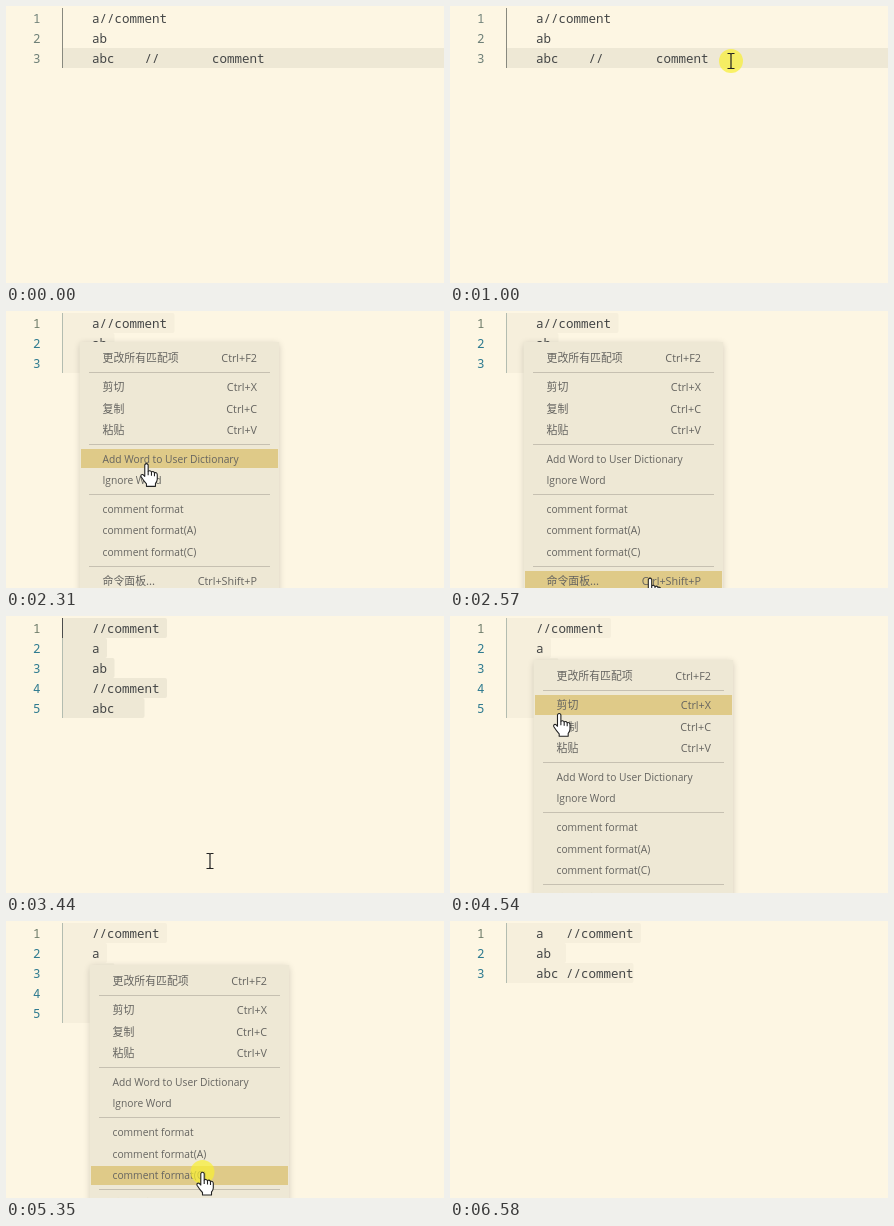
Write an HTML page with a canvas that moves like this. It is 438 px wide and 277 px high and loops after 6650 ms.

```html
<!DOCTYPE html>
<html lang="zh">
<head>
<meta charset="utf-8">
<style>
  html, body { margin: 0; width: 100%; height: 100%; overflow: hidden; background: #fdf6e3; }
  canvas { display: block; }
</style>
</head>
<body>
<canvas id="stage" width="438" height="277"></canvas>
<script>
const ctx = document.getElementById('stage').getContext('2d');
const LOOP = 6650;
const LEFT = 56, TOP = 2, ROW = 20, CHAR = 7.5, INDENT = 4;
const CODE_FONT = '12.5px "Noto Sans Mono", monospace';
const MENU_FONT = '10.25px "Open Sans", "Noto Sans", sans-serif';
const KEYS_FONT = '10.8px "Open Sans", "Noto Sans", sans-serif';
const CJK_FONT = '10.9px "Noto Sans CJK SC", "Noto Sans CJK", sans-serif';

const documents = [
  { from: 0, lines: ['a//comment', 'ab', 'abc    //       comment'] },
  { from: 3310, lines: ['//comment', 'a', 'ab', '//comment', 'abc    '] },
  { from: 5510, lines: ['a   //comment', 'ab ', 'abc //comment'] },
];

const DRAG_START = 1000, DRAG_END = 1420, BLUR = 6510;
const menus = [
  { from: 2100, to: 3310, x: 73.6, y: 30.6 },
  { from: 4270, to: 5510, x: 83.6, y: 44 },
];
const presses = [[DRAG_START, 1900], [2980, 3310], [5350, 5510]];

// [centre offset, label, shortcut]; an entry without a label is a separator
const menuItems = [
  [16, '更改所有匹配项', 'Ctrl+F2'],
  [30.5],
  [45, '剪切', 'Ctrl+X'],
  [67, '复制', 'Ctrl+C'],
  [88, '粘贴', 'Ctrl+V'],
  [102.5],
  [117, 'Add Word to User Dictionary'],
  [138, 'Ignore Word'],
  [152.5],
  [167, 'comment format'],
  [188.5, 'comment format(A)'],
  [210.4, 'comment format(C)'],
  [224.5],
  [239, '命令面板...', 'Ctrl+Shift+P'],
];

// [time, x, y]
const mousePath = [
  [0, 400, 300], [70, 394, 269], [140, 372, 222], [210, 325, 146], [280, 289, 69],
  [480, 180, 24], [680, 113, 16], [790, 113, 16], [950, 281, 55], [1040, 281, 55],
  [1420, 54, 10.5], [1760, 54, 10.5], [1970, 74, 31], [2100, 74, 31],
  [2500, 200, 261], [2570, 200, 267], [2980, 202, 222], [3310, 202, 222],
  [3380, 204, 245], [3500, 204, 245], [3980, 84, 44], [4270, 84, 44],
  [4540, 109, 96.5], [4610, 122, 151], [5020, 195, 249], [5170, 196.5, 251],
  [5760, 196.5, 251], [5830, 215, 253], [6030, 340, 264], [6095, 400, 300], [LOOP, 400, 300],
];

const clamp = (v, lo, hi) => Math.max(lo, Math.min(hi, v));
const within = (t, [from, to]) => t >= from && t < to;

function mouseAt(t) {
  const i = mousePath.findIndex(p => p[0] > t);
  const [t0, x0, y0] = mousePath[i - 1], [t1, x1, y1] = mousePath[i];
  const k = (t - t0) / (t1 - t0);
  return { x: x0 + (x1 - x0) * k, y: y0 + (y1 - y0) * k };
}

function fillRect(color, x, y, w, h, radius = 0) {
  ctx.fillStyle = color;
  ctx.beginPath();
  ctx.roundRect(x, y, w, h, radius);
  ctx.fill();
}

function text(str, x, y, font, color, align = 'left') {
  ctx.font = font;
  ctx.fillStyle = color;
  ctx.textAlign = align;
  ctx.fillText(str, x, y);
}

// Where the selection begins; it always runs to the end of the document.
function selectionStart(t, mouse, lines) {
  if (t < DRAG_START) return null;
  if (t >= DRAG_END) return { row: 0, col: 0 };
  const row = clamp(Math.floor((mouse.y - TOP) / ROW), 0, lines.length - 1);
  const col = clamp(Math.round((mouse.x - LEFT) / CHAR), 0, INDENT + lines[row].length);
  const empty = row === lines.length - 1 && col === INDENT + lines[row].length;
  return empty ? null : { row, col };
}

function drawEditor(t, mouse, focused) {
  const doc = documents.findLast(d => t >= d.from);
  const { lines } = doc;
  const last = lines.length - 1;
  const start = selectionStart(t, mouse, lines);

  if (!start) fillRect('#eee8d5', LEFT, TOP + last * ROW, 438 - LEFT, ROW);
  lines.forEach((line, row) => {
    const y = TOP + row * ROW;
    if (start && row >= start.row) {
      const col = row === start.row ? start.col : 0;
      const end = INDENT + line.length + (row < last ? 1 : 0);
      fillRect(focused ? '#eee8d5' : '#f6efdc', LEFT + col * CHAR, y, (end - col) * CHAR, ROW, [0, 2, 2, 0]);
    }
    const numberColor = !start ? '#6f8078' : row === start.row ? '#6c7a68' : '#2f7b90';
    text(row + 1, 34.5, y + 14.5, CODE_FONT, numberColor, 'right');
    text(line, LEFT + INDENT * CHAR, y + 14.5, CODE_FONT, '#444646');
  });
  fillRect(start ? '#b3bcb0' : '#88897f', LEFT, TOP, 1, lines.length * ROW);

  const blinkOn = Math.floor((t - doc.from) / 500) % 2 === 0;
  if (doc.from && focused && blinkOn) fillRect('#4a4c4c', LEFT, TOP, 1, ROW);
}

function drawMenu({ x, y }, hovered) {
  ctx.save();
  ctx.shadowColor = 'rgba(0,0,0,.2)';
  ctx.shadowBlur = 7;
  ctx.shadowOffsetY = 2;
  fillRect('#eee8d5', x, Math.round(y), 199.5, 290);
  ctx.restore();
  for (const item of menuItems) {
    const [offset, label, shortcut] = item;
    if (!label) {
      fillRect('#c6c0b1', Math.round(x) + 9, Math.floor(y + offset), 181, 1);
      continue;
    }
    const baseline = Math.round(y + offset + 4);
    if (item === hovered) {
      const top = Math.round(y + offset - 9.6), bottom = Math.round(y + offset + 9.6);
      fillRect('#dfca88', Math.round(x) + 1, top, 197, bottom - top);
    }
    const isCjk = label.charCodeAt(0) > 255;
    text(label, x + 22.9, baseline, isCjk ? CJK_FONT : MENU_FONT, '#656460');
    if (shortcut) text(shortcut, x + 177.4, baseline, KEYS_FONT, '#656460', 'right');
  }
}

const arrowShape = new Path2D('M0 0V16L3.7 12.6L6.4 18.8L9 17.6L6.3 11.6H11.3Z');
const handShape = new Path2D(
  'M-1.7 1.5Q0 -1 1.7 1.5V8Q3.5 6.6 5 8.6Q6.8 7.5 8 9.4Q10.6 8.7 10.8 11.5V16' +
  'Q10.6 18.5 9 20V23H0V20.5Q-2.5 18 -5.5 13.2Q-6 10.8 -3.5 11.2L-1.7 13Z');
const handCreases = new Path2D('M1.7 8V12M5 8.6V12.5M8 9.4V13');
const beamShape = new Path2D('M-3.5 -7.5H-1Q0 -7.5 0 -6.5Q0 -7.5 1 -7.5H3.5M0 -6.5V6.5M-3.5 7.5H-1Q0 7.5 0 6.5Q0 7.5 1 7.5H3.5');

function drawPointer(mouse, kind, pressed) {
  if (pressed) fillRect('rgba(248,240,50,.7)', mouse.x - 12, mouse.y - 12, 24, 24, 12);
  ctx.save();
  ctx.translate(mouse.x, mouse.y);
  ctx.lineJoin = 'round';
  ctx.strokeStyle = '#222';
  if (kind === 'beam') {
    ctx.lineWidth = 1.2;
    ctx.stroke(beamShape);
  } else {
    const shape = kind === 'hand' ? handShape : arrowShape;
    ctx.fillStyle = '#fff';
    ctx.fill(shape);
    ctx.lineWidth = 1.1;
    ctx.stroke(shape);
    if (kind === 'hand') ctx.stroke(handCreases);
  }
  ctx.restore();
}

function draw(t) {
  const mouse = mouseAt(t);
  const menu = menus.find(m => within(t, [m.from, m.to]));
  const hovered = menu && menuItems.find(([offset, label]) =>
    label && Math.abs(mouse.y - menu.y - offset) < 10.5);

  fillRect('#fdf6e3', 0, 0, 438, 277);
  drawEditor(t, mouse, !menu && t < BLUR);
  if (menu) drawMenu(menu, hovered);
  const kind = hovered ? 'hand' : menu || mouse.x < LEFT + 1 ? 'arrow' : 'beam';
  drawPointer(mouse, kind, presses.some(p => within(t, p)));
}

const began = performance.now();
function tick() {
  draw((performance.now() - began) % LOOP);
  requestAnimationFrame(tick);
}
tick();
</script>
</body>
</html>
```
